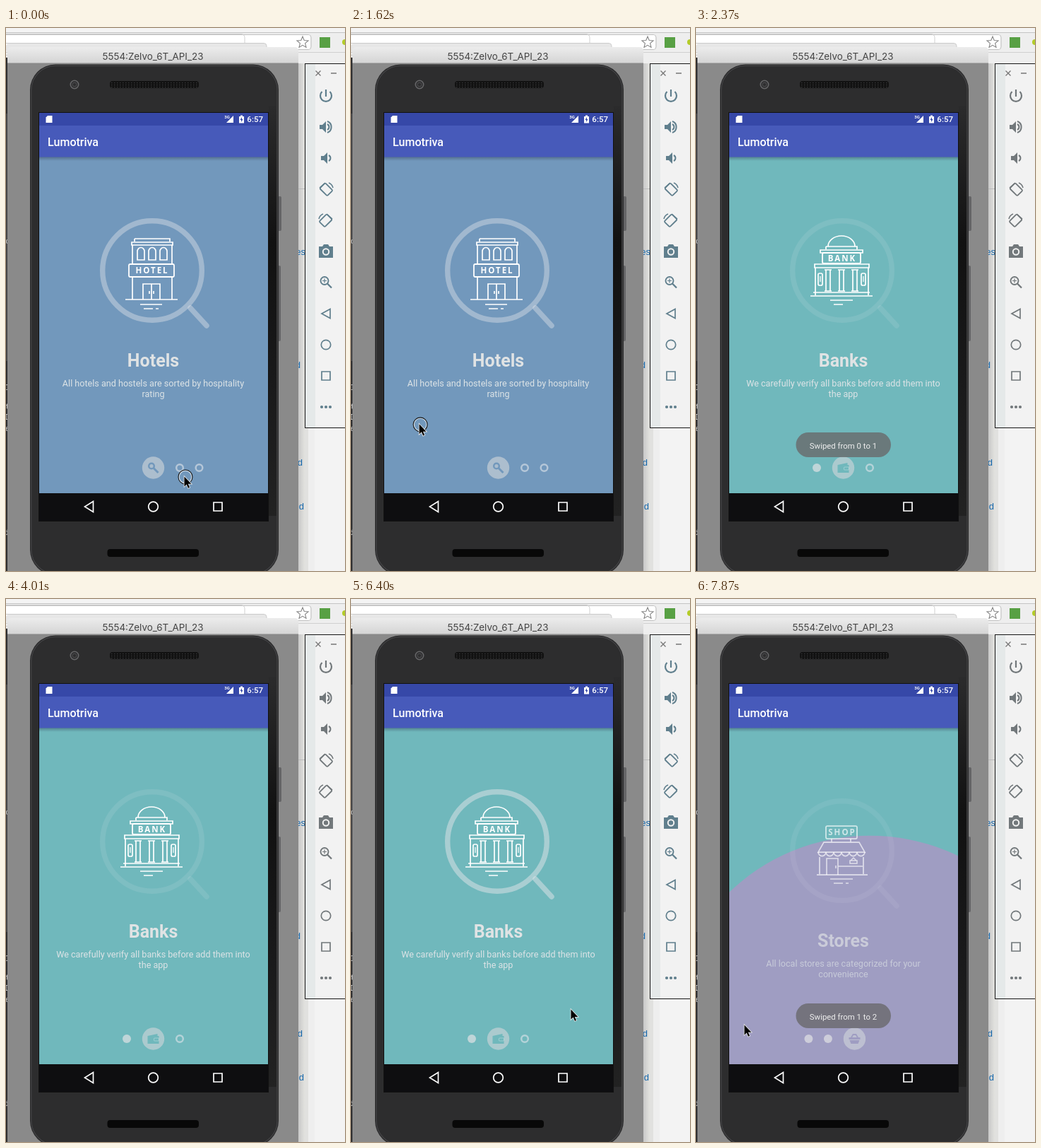
Write an HTML page with a canvas that moves like this. It is 480 px wide and 768 px high and loops after 8000 ms.

```html
<!DOCTYPE html>
<html lang="en">
<head>
<meta charset="utf-8">
<title>Onboarding demo</title>
<style>
html, body { margin: 0; width: 100%; height: 100%; overflow: hidden; background: #8b8b8b; }
canvas { display: block; }
</style>
</head>
<body>
<canvas id="stage" width="480" height="768"></canvas>
<script>
const ctx = document.getElementById('stage').getContext('2d');
const LOOP = 8000, STEP = 148.75, SWIPE_TIME = 500, SWIPES = [1613, 7617];
const clamp = v => Math.max(0, Math.min(1, v));
const mix = (a, b, p) => a + (b - a) * p;

function stroke(d, color, width = 2) {
  ctx.strokeStyle = color;
  ctx.lineWidth = width;
  ctx.stroke(new Path2D(d));
}
function fill(d, color) {
  ctx.fillStyle = color;
  ctx.fill(new Path2D(d), 'evenodd');
}
function box(x, y, w, h, color, r = 0) {
  ctx.beginPath();
  ctx.roundRect(x, y, w, h, r);
  ctx.fillStyle = color;
  ctx.fill();
}
function frame(x, y, w, h, color, width = 2, r = 0) {
  ctx.beginPath();
  ctx.roundRect(x, y, w, h, r);
  ctx.strokeStyle = color;
  ctx.lineWidth = width;
  ctx.stroke();
}
function disc(x, y, r, color) {
  ctx.beginPath();
  ctx.arc(x, y, r, 0, 7);
  ctx.fillStyle = color;
  ctx.fill();
}
function ring(x, y, r, color, width = 2) {
  ctx.beginPath();
  ctx.arc(x, y, r, 0, 7);
  ctx.strokeStyle = color;
  ctx.lineWidth = width;
  ctx.stroke();
}
function text(s, x, y, font, color, align = 'center') {
  ctx.font = font;
  ctx.fillStyle = color;
  ctx.textAlign = align;
  ctx.fillText(s, x, y);
}
function shade(x0, y0, x1, y1, ...colors) {
  const g = ctx.createLinearGradient(x0, y0, x1, y1);
  colors.forEach((c, i) => g.addColorStop(i / (colors.length - 1), c));
  return g;
}
function group(x, y, draw, alpha = 1) {
  ctx.save();
  ctx.translate(x, y);
  ctx.globalAlpha *= alpha;
  draw();
  ctx.restore();
}
const sans = (size, weight = 400) => `${weight} ${size}px Roboto, sans-serif`;

function sign(label, x, y, w, h) {
  frame(x, y, w, h, '#fff', 1.8, 2);
  ctx.letterSpacing = '2px';
  text(label, x + w / 2 + 1, y + h / 2 + 4.2, '700 11.5px "Open Sans", sans-serif', '#fff');
  ctx.letterSpacing = '0px';
}
function hotel() {
  stroke('M182 298H232V302M182 298V302M178 303H236V307H178ZM179 307V334M235 307V334M179 353V384M235 353V384', '#fff', 1.7);
  for (const x of [191, 207, 223])
    stroke(`M${x - 5} 328V316a5 5.5 0 0 1 10 0V328Z`, '#fff', 1.7);
  sign('HOTEL', 174, 334, 64, 18);
  stroke('M169 384H243M194 384V362H218V384M206 362V384M203 372V376M209 372V376M190 391H221M195 397H208M212 397H216', '#fff', 1.7);
}
function bank() {
  stroke('M187 309a19 15 0 0 1 38 0M184 309H228V313M184 309V313M176 314H236V318H176Z', '#fff', 1.7);
  sign('BANK', 179, 318, 54, 15);
  stroke('M168 334H245V339H168ZM169 339V378M244 339V378M162 379H250M166 374H246M190 385H222M195 391H208', '#fff', 1.7);
  for (const x of [187, 206, 225])
    stroke(`M${x - 5} 342H${x + 5}M${x - 3} 342V372M${x + 3} 342V372M${x - 5} 372H${x + 5}`, '#fff', 1.7);
  for (const x of [176, 237]) {
    frame(x - 3, 347, 6, 17, '#fff', 1.7, 2);
    stroke(`M${x} 351V359`, '#fff', 1.2);
  }
}
function shop() {
  sign('SHOP', 184, 308, 44, 18);
  stroke('M192 326V331M219 326V331M181 331H231L239 345H173ZM175 352V376M237 352V376M171 377H243', '#fff', 1.7);
  let scallops = 'M173 345';
  for (let i = 0; i < 6; i++) scallops += 'a5.5 5.5 0 0 0 11 0';
  stroke(scallops, '#fff', 1.7);
  stroke('M185 377V354H201V377M198 364V368M201 365H236', '#fff', 1.6);
  stroke('M218 357H228V361H218ZM219 357l4 -4l4 4M190 383H222M195 389H208M212 389H216', '#fff', 1.5);
}

function magnifierIcon(color) {
  ring(-2.5, -2.5, 3.8, color, 2.5);
  stroke('M.5 .5L7 7', color, 3);
}
function walletIcon(color) {
  fill('M-8 -4L6 -7V-4H8V7H-8Z', color);
  frame(1, -1, 7, 4, 'rgba(255,255,255,.3)', 1, 1);
}
function basketIcon(color) {
  fill('M-8 -2H8V1H-8ZM-7 2H7L5 7H-5Z', color);
  stroke('M-5 -1L-2 -6H2L5 -1', color, 1.8);
}

const PAGES = [
  { color: '#7298bc', title: 'Hotels', lines: ['All hotels and hostels are sorted by hospitality', 'rating'], art: hotel, icon: magnifierIcon },
  { color: '#70b8bc', title: 'Banks', lines: ['We carefully verify all banks before add them into', 'the app'], art: bank, icon: walletIcon },
  { color: '#9f9dc2', title: 'Stores', lines: ['All local stores are categorized for your', 'convenience'], art: shop, icon: basketIcon }
];

function content(page, dy, alpha, glass) {
  group(0, dy, () => {
    const tint = `rgba(226,229,233,${glass})`;
    ring(207, 343, 70.3, tint, 7.4);
    ctx.lineCap = 'round';
    stroke('M261 396L284 421', tint, 7.5);
    ctx.lineCap = 'butt';
    page.art();
    text(page.title, 208.5, 479, sans(25, 700), '#e0e3e4');
    page.lines.forEach((s, i) => text(s, 208.5, 507 + i * 15, sans(12.6), '#dce3e6'));
  }, alpha);
}

function pager(from, to, p, color) {
  const move = 1 - (1 - p) ** 1.12, grow = from === to ? 1 : clamp(p * 2.2);
  const size = i => i === to ? grow : i === from ? 1 - grow : 0;
  const gap = i => 27.5 + 10 * (size(i) + size(i + 1));
  // The strip is laid out around the page being opened.
  const middle = 208.5 + (to - from) * 37.5 * (1 - move);
  PAGES.forEach((page, i) => {
    let x = middle;
    for (let j = i; j < to; j++) x -= gap(j);
    for (let j = to; j < i; j++) x += gap(j);
    const s = size(i);
    if (s > 0) {
      disc(x, 622, mix(6, 15.7, s), 'rgba(208,214,218,.62)');
      group(x, 622, () => { ctx.scale(s, s); page.icon(color); }, s);
    } else if (i < to) disc(x, 622, 6, 'rgba(225,225,228,.7)');
    else ring(x, 622, 4.8, 'rgba(222,228,234,.62)', 2.5);
  });
}

function toast(label, alpha) {
  if (alpha <= 0) return;
  group(0, 0, () => {
    box(141.5, 572, 134.5, 35, 'rgba(105,105,108,.8)', 17.5);
    text(label, 208.5, 594.5, sans(11.4), '#eee');
  }, alpha);
}

function app(t) {
  const passed = SWIPES.filter(s => t >= s).length;
  const p = passed ? clamp((t - SWIPES[passed - 1]) / SWIPE_TIME) : 1;
  const moving = p < 1, from = moving ? passed - 1 : passed;
  const now = PAGES[passed], old = PAGES[from];
  const glass = passed === 0 ? .42 : passed === 1 && t > 6000 ? .5 : .12;

  ctx.save();
  ctx.beginPath();
  ctx.rect(47, 182, 324, 476);
  ctx.clip();
  box(47, 182, 324, 476, old.color);
  if (moving) {
    disc(246, 622, 520 * (1 - Math.cos(Math.PI * p)) / 2, now.color);
    content(old, -28 * p, clamp(1 - p * 3), passed === 1 ? .42 : .5);
    content(now, 28 * (1 - p), clamp((p - .2) * 2), glass);
  } else content(now, 0, 1, glass);
  pager(from, passed, p, now.color);
  toast('Swiped from 0 to 1', Math.min(clamp((t - 1650) / 200), clamp((3960 - t) / 450)));
  toast('Swiped from 1 to 2', clamp((t - 7650) / 200));
  ctx.restore();

  box(47, 182, 324, 6, shade(0, 182, 0, 188, 'rgba(40,50,70,.4)', 'rgba(40,50,70,0)'));
  box(47, 120, 324, 18, '#3648a8');
  box(47, 138, 324, 44.5, '#475aba');
  fill('M59 124H65.5V134H56.5V126.5Z', '#fff');
  fill('M322 124V134H312Z', '#fff');
  text('3G', 313, 128, sans(6, 700), '#fff');
  fill('M330 125H332V123.5H335V125H337V134.5H330ZM334 126L331.5 130H333V133L335.5 129H334Z', '#fff');
  text('6:57', 364, 133, sans(11.5, 500), '#fff', 'right');
  text('Lumotriva', 59, 167, sans(16, 500), '#fff', 'left');

  box(47, 658, 324, 39, '#0e0e10');
  stroke('M123.5 669.5V684.5L111.5 677Z', '#fff', 1.7);
  ring(208.5, 677, 6.8, '#fff', 1.7);
  frame(294, 671, 12, 12, '#fff', 1.7);
}

function desktop() {
  box(0, 0, 480, 768, '#eeeeee');
  box(0, 0, 480, 7, '#f4f4f4');
  box(0, 6, 480, 1, '#c4c4c4');
  frame(-10, 9.5, 442, 21, '#c0c0c0', 1, 4);
  box(-10, 10, 441, 20, '#fff', 3);
  frame(-10, 8.5, 348, 30, '#cfcfcf', 1, 5);
  let star = '';
  for (let i = 0; i < 10; i++) {
    const a = i * Math.PI / 5 - Math.PI / 2, r = i % 2 ? 3.8 : 8.5;
    star += `${i ? 'L' : 'M'}${420 + r * Math.cos(a)} ${20.5 + r * Math.sin(a)}`;
  }
  stroke(star + 'Z', '#858585', 1.1);
  box(444, 13, 15, 15, '#58a044');
  disc(480, 20, 4, '#b4cc28');
  box(0, 34, 480, 1, '#d0d0d0');
  box(414, 62, 14, 706, '#e1e1df');
  box(414, 50, 9, 718, shade(414, 0, 423, 0, '#c8c8c8', '#e2e2de'));
  box(414, 227, 10, 1, '#bbb');
  box(437, 566, 43, 202, '#f3f3f3');
  [['es', 317, 424], ['d', 477, 417], ['d', 615, 420], ['d', 677, 422]].forEach(([s, y, right]) =>
    text(s, right, y + 4, '13px "Liberation Sans", Arial, sans-serif', '#1668ac', 'right'));

  box(0, 42, 3, 726, '#2d2d2f');
  box(0, 121, 3, 350, '#444446');
  [['c', 302], ['1', 509], ['t', 536], ['D', 551], ['e', 567], ['i', 714]].forEach(([s, y]) =>
    text(s, 5, y + 3, '10px "DejaVu Sans Mono", monospace', '#ccc', 'right'));

  box(0, 22, 369, 12, '#e7e7e7', 4);
  frame(-5, 21.5, 374, 20, '#cbcbcb', 1, 4);
  box(2, 27, 412, 25, shade(0, 27, 0, 50, '#ececec', '#d4d4d4'), [5, 5, 0, 0]);
  box(2, 49.5, 412, 719, '#8a8a8a');
  text('5554:Zelvo_6T_API_23', 208, 44.5, '13.4px Inter, sans-serif', '#444');
}

function phone() {
  box(385, 238, 5, 49, '#656567', 2);
  box(385, 336, 4, 107, '#656567', 2);
  box(34, 51.5, 352, 722.5, '#2a2a2b', 36);
  frame(36, 53.5, 348, 718.5, '#414143', 1.5, 34);
  box(37.5, 55, 345, 715.5, '#2d2d2e', 32);
  box(372, 110, 11, 580, shade(0, 110, 0, 690, '#2b2b2c', '#111', '#19191a', '#222'));
  box(46, 119, 326, 579, '#111');
  ring(97, 80, 5.7, '#666668', 1.6);
  ring(97, 80, 2.8, '#454547', 1.4);
  box(147, 75, 126, 10, '#111', 4);
  for (let x = 149; x < 271; x += 4)
    for (let y = 77; y < 85; y += 3) box(x, y, 1.5, 1.2, '#39393a');
  box(143.5, 737, 129.5, 11, '#080808', 4);
}

function toolbar(t) {
  const c = t > 2100 && t < 5800 || t > 7700 ? '#72787b' : '#607f8d';
  box(423, 50, 60, 516, '#161616');
  box(424, 51, 56, 514, '#f2f2f2');
  box(424, 51, 14, 514, '#e5e9e9');
  stroke('M438.5 60.5L445.5 67.5M445.5 60.5L438.5 67.5M460 64H468', '#777', 1.4);
  stroke('M447.5 90A8 8 0 1 0 458.5 90M453 87V97', c, 2.2);
  const speaker = y => fill(`M444 ${y - 3}H448L453 ${y - 8}V${y + 8}L448 ${y + 3}H444Z`, c);
  speaker(140);
  stroke('M455 136a4.5 4.5 0 0 1 0 8M455 132a8.5 8.5 0 0 1 0 16', c, 2);
  group(2, 0, () => {
    speaker(184);
    stroke('M455 180a4.5 4.5 0 0 1 0 8', c, 2);
  });
  [[228, 1], [272, -1]].forEach(([y, side]) => group(453, y, () => {
    ctx.scale(side, 1);
    stroke('M-9 -2L-1 -9M4 -9A10 10 0 0 1 10 -2', c, 1.6);
    ctx.rotate(Math.PI / 4);
    frame(-7, -5.5, 15, 11, c, 1.8, 1.5);
  }));
  fill('M443 309H448L450 306H456L458 309H463V325H443Z', c);
  ring(453, 316.5, 4.2, '#f2f2f2', 2);
  ring(451, 357.5, 5.5, c, 1.9);
  stroke('M455 361.5L461 367.5', c, 2.3);
  stroke('M448 357.5H454M451 354.5V360.5', c, 1.2);
  stroke('M459 397.5V410.5L447 404Z', c, 1.7);
  ring(453, 448, 6.7, c, 1.7);
  frame(447, 486, 12, 12, c, 1.7);
  for (const x of [447, 453, 459]) disc(x, 536, 2.1, c);
}

// time, x, y of the pointer tip
const POINTER = [
  [[0, 252, 634], [450, 262, 628], [890, 330, 560], [1190, 232, 544], [1490, 95, 560], [1640, 20, 580], [1800, -30, 590]],
  [[5652, 312, 535], [6100, 322, 560], [6690, 300, 600], [7140, 255, 612], [7437, 113, 607], [7884, 68, 602]]
];
const PRESSES = [[0, 290], [880, 1520], [6830, 7550]];

function pointer(t) {
  const path = POINTER.find(k => t >= k[0][0] - 10 && t <= k.at(-1)[0] + 10);
  if (!path) return;
  const i = Math.max(1, path.findIndex(k => k[0] >= t));
  const a = path[i - 1], b = path[i], p = clamp((t - a[0]) / (b[0] - a[0]));
  group(mix(a[1], b[1], p), mix(a[2], b[2], p), () => {
    if (PRESSES.some(([s, e]) => t >= s && t <= e)) {
      ring(2, 1, 8.9, 'rgba(255,255,255,.75)', 1.3);
      ring(2, 1, 10, '#1a1a1a', 1.1);
    }
    const arrow = 'M.5 .5V14.5L3.7 11.5L6 16.7L8 15.8L5.8 10.8H10.3Z';
    stroke(arrow, '#e8e8e8', 1.6);
    fill(arrow, '#000');
  });
}

function draw(now) {
  const t = Math.floor((now % LOOP + 15) / STEP) * STEP;
  desktop();
  phone();
  app(t);
  toolbar(t);
  pointer(t);
}

const start = performance.now();
function tick() {
  draw(performance.now() - start);
  requestAnimationFrame(tick);
}
tick();
</script>
</body>
</html>
```
